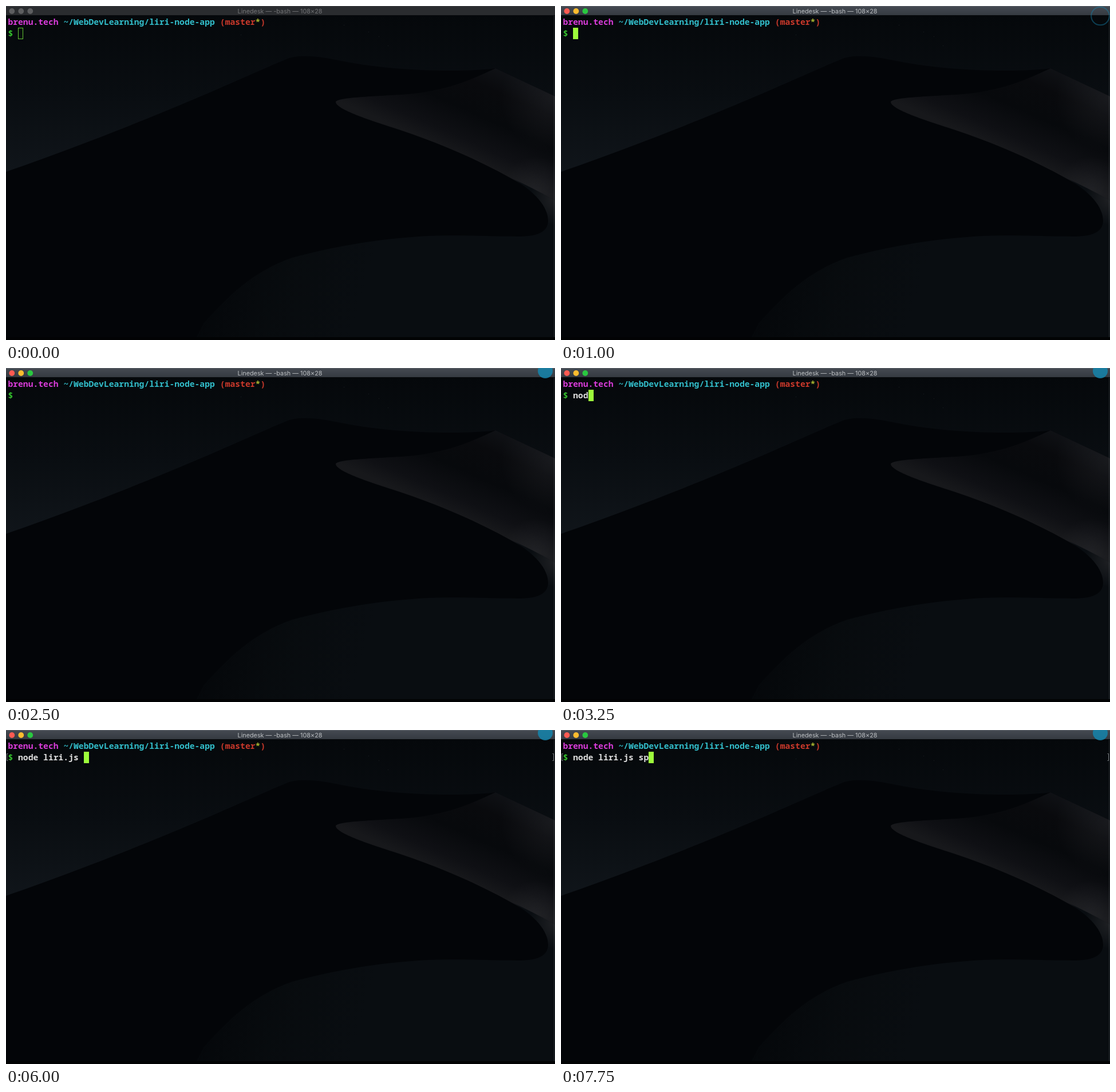
An HTML page with a canvas that plays this animation: 959x584 px, repeating every 8000 ms.

```html
<!DOCTYPE html>
<html lang="en">
<head>
<meta charset="utf-8">
<title>Shell session</title>
<style>
html, body { margin: 0; width: 100%; height: 100%; overflow: hidden; background: #030508; }
canvas { display: block; }
</style>
</head>
<body>
<canvas id="stage" width="959" height="584"></canvas>
<script>
const ctx = document.getElementById('stage').getContext('2d');
const W = 959, H = 584, LOOP = 8000;
const CELL = 8.82, LEFT = 3.4;

const dune = new Path2D('M0 290C150 238 290 180 375 143S470 101 490 93C510 84 545 88 575 94C640 108 720 114 790 113Q835 112 855 109L959 158V584H0Z');
const face = new Path2D('M855 109C800 135 760 150 690 155C640 158 577 160 576 168C577 182 650 204 680 214C760 240 830 272 880 300Q925 325 959 340V158Z');
const sand = new Path2D('M959 340Q920 318 885 302C925 325 947 352 947 375C947 397 925 403 895 403C840 403 790 400 740 402C640 407 560 424 500 440C430 465 390 505 345 555L330 584H959Z');

const prompt = [
  ['brenu.tech', 0, '#da3cdb'],
  ['~/WebDevLearning/liri-node-app', 11, '#32bdca'],
  ['(master', 42, '#cb392b'],
  ['*', 49, '#aebc32'],
  [')', 50, '#cb392b']
];
const command = 'node liri.js sp';
// [time, characters typed]
const typing = [[0, 0], [2750, 1], [3000, 2], [3250, 3], [4500, 5], [5500, 6], [5750, 7], [6000, 13], [7500, 14], [7750, 15]];
// [time, shape, x, y] of the pointer marker
const pointer = [[0, ''], [500, 'disc', 961, 23], [750, 'disc', 942, 5], [1000, 'ring', 942, 17.5],
  [1250, 'disc', 942, 5], [1500, 'ring', 942, 17.5], [1750, 'disc', 942, 5]];

const at = (steps, t) => steps.filter(s => s[0] <= t).pop();

function linear(x0, y0, x1, y1, ...stops) {
  const g = ctx.createLinearGradient(x0, y0, x1, y1);
  stops.forEach(([pos, color]) => g.addColorStop(pos, color));
  return g;
}

function rect(color, x, y, w, h) {
  ctx.fillStyle = color;
  ctx.fillRect(x, y, w, h);
}

function fill(path, paint) {
  ctx.fillStyle = paint;
  ctx.fill(path);
}

function disc(x, y, r, color) {
  ctx.beginPath();
  ctx.arc(x, y, r, 0, 7);
  ctx.fillStyle = color;
  ctx.fill();
}

function glow(path, x, y, r, rgb, alpha) {
  const g = ctx.createRadialGradient(x, y, 0, x, y, r);
  g.addColorStop(0, `rgba(${rgb},${alpha})`);
  g.addColorStop(1, `rgba(${rgb},0)`);
  fill(path, g);
}

function landscape() {
  rect(linear(0, 16, 0, 290, [0, '#05080b'], [0.5, '#090d11'], [1, '#10151a']), 0, 0, W, H);
  for (const [x, y] of [[590, 33], [633, 45], [651, 53], [410, 50], [667, 69]]) rect('#1b2023', x, y, 1, 1);
  fill(dune, '#030508');
  fill(face, linear(740, 236, 808, 82, [0, '#17181b'], [0.16, '#0f1014'], [0.45, '#07090c'], [0.75, '#090a0d'], [1, '#101216']));
  glow(face, 959, 160, 95, '32,33,37', 0.6);
  glow(face, 925, 323, 60, '38,39,43', 0.6);
  fill(sand, linear(345, 510, 600, 584, [0, 'rgba(9,13,16,.25)'], [0.5, 'rgba(9,13,16,.8)'], [1, '#090d11']));
  glow(sand, 959, 338, 45, '36,37,40', 0.8);
  rect('#020304', 0, 579, W, 5);
}

function titleBar(active) {
  rect(active ? linear(0, 0, 0, 17, [0, '#454a52'], [1, '#343940']) : '#2a2c2f', 0, 0, W, 17);
  rect(active ? '#5b6067' : '#3d3f42', 0, 0, W, 1);
  rect('#090b0d', 0, 16, W, 1);
  rect('rgba(120,126,130,.28)', 957, 17, 1, 562);
  const lights = active ? ['#ff5a52', '#fdbc2f', '#2ac840'] : Array(3).fill('#5d5e60');
  lights.forEach((color, i) => disc(10.3 + 16 * i, 9, 4.9, color));
  ctx.font = '10.8px Inter, Roboto, sans-serif';
  ctx.textAlign = 'center';
  ctx.fillStyle = active ? '#bdc0c4' : '#737476';
  ctx.fillText('Linedesk — -bash — 108×28', 478.5, 13);
}

function text(str, col, row, color) {
  ctx.fillStyle = color;
  ctx.fillText(str, LEFT + col * CELL, 33 + row * 20);
}

function shell(t, active) {
  ctx.font = '600 14.7px "Noto Sans Mono", "DejaVu Sans Mono", monospace';
  ctx.textAlign = 'left';
  for (const [str, col, color] of prompt) text(str, col, 0, color);
  text('$', 0, 1, '#36c52e');
  const count = at(typing, t)[1];
  text(command.slice(0, count), 2, 1, '#dedede');

  const x = Math.round(LEFT + (count + 2) * CELL);
  const blinkOff = t >= 1500 && t < 2000 || t >= 2500 && t < 2750;
  if (!active) {
    ctx.strokeStyle = '#62c532';
    ctx.lineWidth = 1;
    ctx.strokeRect(x + 0.5, 38.5, 8, 19);
  } else if (!blinkOff) {
    rect('#9dfb3b', x, 38, 9, 20);
  }

  if (t >= 6000) {
    ctx.strokeStyle = '#73777a';
    ctx.lineWidth = 1;
    ctx.stroke(new Path2D('M3.5 41.5H1.5V53.5H3.5M954.5 41.5H956.5V53.5H954.5'));
  }
}

function marker(t) {
  const [, shape, x, y] = at(pointer, t);
  if (shape === 'disc') disc(x, y, 13, 'rgba(22,130,168,.88)');
  if (shape === 'ring') {
    ctx.beginPath();
    ctx.arc(x, y, 15.8, 0, 7);
    ctx.strokeStyle = 'rgba(22,130,168,.45)';
    ctx.lineWidth = 2;
    ctx.stroke();
  }
}

function draw(now) {
  const t = now % LOOP, active = t >= 1000;
  landscape();
  titleBar(active);
  shell(t, active);
  marker(t);
  requestAnimationFrame(draw);
}
requestAnimationFrame(draw);
</script>
</body>
</html>
```
